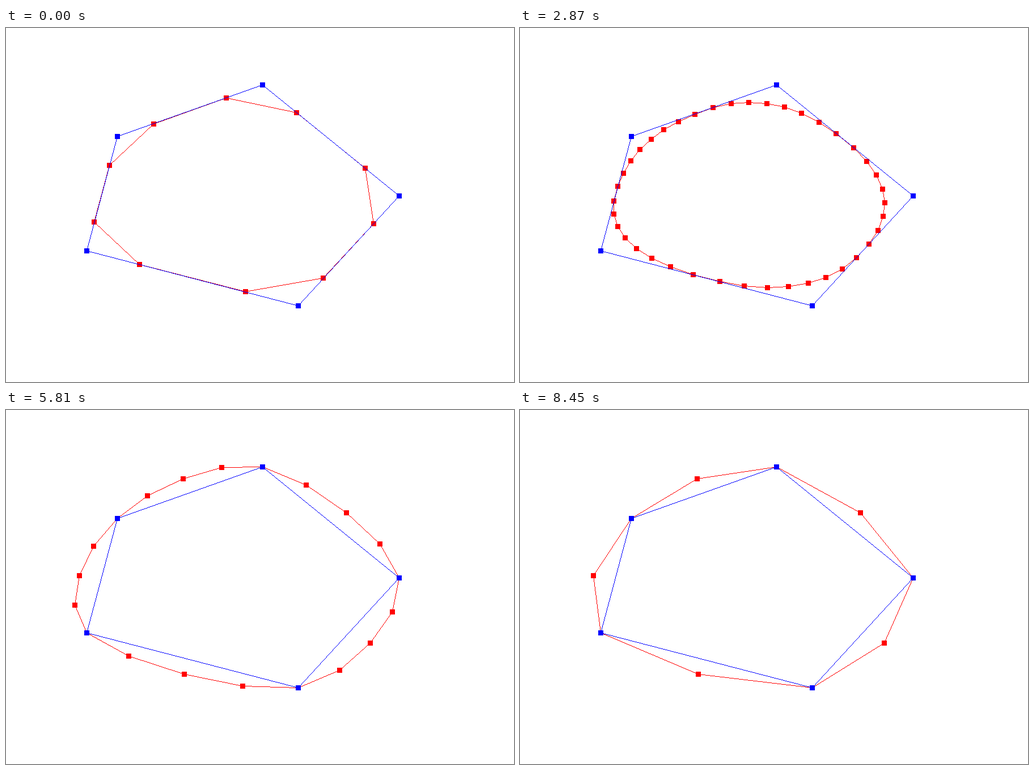
Recreate the animation shown at these times as a matplotlib script. Size 896x625 px, loop 9.69 s.

```python
import numpy as np
import matplotlib.pyplot as plt
from matplotlib.animation import FuncAnimation

W, H, DPI = 896, 625, 100
LOOP, STEP = 9690, 30
RED, BLUE = (255, 0, 0), (0, 0, 255)
HALF = 4  # markers are 9 px wide

CORNERS = np.array([(196.2, 191.9), (452.5, 100.7), (693.5, 296.9),
                    (515.4, 490.0), (142.2, 393.0)])


def interleave(a, b):
    return np.stack([a, b], axis=1).reshape(-1, 2)


def cut_corners(p):
    """Chaikin subdivision: every edge keeps its quarter points."""
    q = np.roll(p, -1, axis=0)
    return interleave(0.75 * p + 0.25 * q, 0.25 * p + 0.75 * q)


def four_point(p):
    """Interpolating subdivision: old points stay, one is added per edge."""
    before, after, far = (np.roll(p, k, axis=0) for k in (1, -1, -2))
    return interleave(p, (9 * (p + after) - before - far) / 16)


def draw_line(img, a, b, color):
    n = max(np.abs(b - a).max(), 1)
    t = np.arange(n + 1)[:, None] / n
    x, y = np.floor(a + (b - a) * t + 0.5).astype(int).T
    img[y, x] = color


def draw_polygon(img, pts, color):
    pts = np.floor(pts).astype(int)
    for a, b in zip(pts, np.roll(pts, -1, axis=0)):
        draw_line(img, a, b, color)


def draw_markers(img, pts, color):
    for x, y in np.floor(pts).astype(int):
        img[y - HALF:y + HALF + 1, x - HALF:x + HALF + 1] = color


def picture(scheme, level):
    pts = CORNERS
    for _ in range(level):
        pts = scheme(pts)
    img = np.full((H, W, 3), 255, np.uint8)
    draw_polygon(img, pts, RED)
    draw_markers(img, pts, RED)
    draw_polygon(img, CORNERS, BLUE)
    draw_markers(img, CORNERS, BLUE)
    return img


# start time in ms, scheme, subdivision level
SCHEDULE = [
    (0, cut_corners, 1), (690, cut_corners, 2), (1000, cut_corners, 3),
    (1310, cut_corners, 4), (2870, cut_corners, 3), (3100, cut_corners, 2),
    (3410, cut_corners, 1),
    (4560, four_point, 1), (5810, four_point, 2), (6110, four_point, 3),
    (6420, four_point, 4), (7820, four_point, 3), (8130, four_point, 2),
    (8450, four_point, 1),
]
STARTS = [s[0] for s in SCHEDULE]
PICTURES = {(f, n): picture(f, n)
            for f in (cut_corners, four_point) for n in range(1, 5)}

plt.rcParams["savefig.dpi"] = DPI
fig = plt.figure(figsize=(W / DPI, H / DPI), dpi=DPI, facecolor="white")
canvas = fig.figimage(PICTURES[cut_corners, 1], origin="upper")


def update(i):
    t = i * STEP + 20  # steps between ticks take effect on the earlier tick
    k = np.searchsorted(STARTS, t, side="right") - 1
    canvas.set_data(PICTURES[SCHEDULE[k][1:]])
    return [canvas]


anim = FuncAnimation(fig, update, frames=LOOP // STEP, interval=STEP,
                     init_func=lambda: update(0), repeat=True,
                     repeat_delay=0, blit=False)
plt.show()
```
